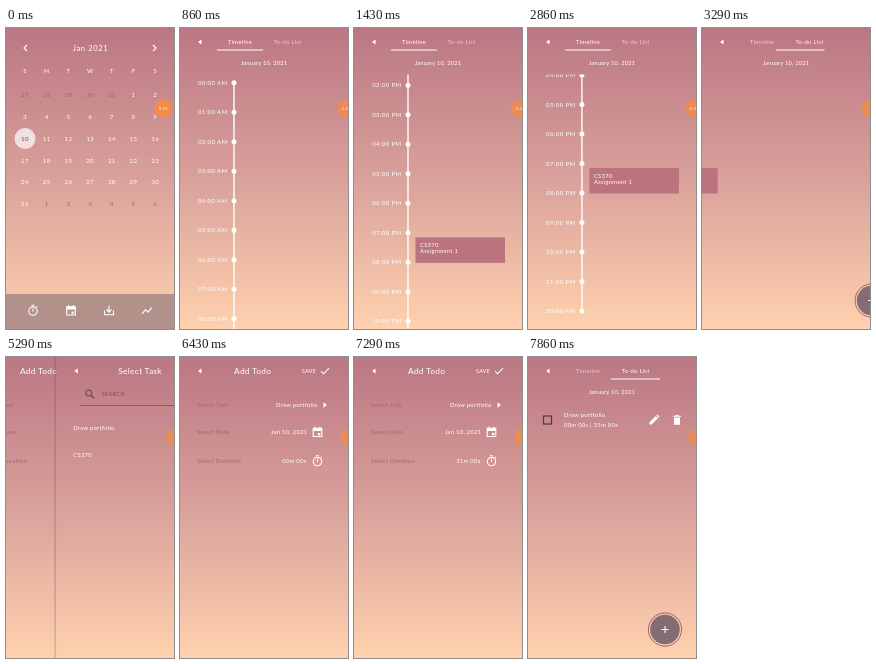
Animation, 168 px wide and 301 px high, one loop 8 s. Source, as an HTML page:

```html
<!DOCTYPE html>
<html lang="en">
<head>
<meta charset="utf-8">
<title>Planner</title>
<style>
html, body { margin: 0; width: 100%; height: 100%; overflow: hidden; background: #d8a09a; }
svg { display: block; width: 100vw; height: 100vh; }
text { font-family: Lato, "Open Sans", sans-serif; letter-spacing: .3px; fill: #fff; }
.dim { fill: #9c6672; }
.dark { fill: #75505b; }
.line { fill: none; stroke: #fff; stroke-width: 1.1; }
</style>
</head>
<body>
<svg id="stage" viewBox="0 0 168 301" preserveAspectRatio="none">
  <defs>
    <linearGradient id="sky" x2="0" y2="1">
      <stop stop-color="#bb7783"/>
      <stop offset=".5" stop-color="#d9a19b"/>
      <stop offset="1" stop-color="#ffd1ae"/>
    </linearGradient>
    <linearGradient id="edge">
      <stop stop-color="#5a3040" stop-opacity="0"/>
      <stop offset="1" stop-color="#5a3040" stop-opacity=".3"/>
    </linearGradient>
    <clipPath id="below"><rect y="46.5" width="168" height="255"/></clipPath>
  </defs>
  <g id="calendar"></g>
  <g id="day"></g>
  <g id="add"></g>
  <g id="select"></g>
  <g id="bubble"></g>
</svg>
<script>
const $ = id => document.getElementById(id);
const W = 168, FRAME = 1000 / 7, LOOP = 8000;

// ---- drawing helpers ----
const label = (x, y, s, size = 5.8, anchor = 'start', attrs = '') =>
  `<text x="${x}" y="${y + size * .35}" font-size="${size}" text-anchor="${anchor}" ${attrs}>${s}</text>`;
const path = (d, attrs = 'class="line"') => `<path d="${d}" ${attrs}/>`;
const at = (x, y, body) => `<g transform="translate(${x} ${y})">${body}</g>`;
const page = body =>
  `<rect x="-3" width="3" height="301" fill="url(#edge)"/><rect width="168" height="301" fill="url(#sky)"/>${body}`;
const back = path('M21.5 11.4v5.2l-3.4-2.6z', 'fill="#fff"');

const icons = {
  calendar: path('M-4.3-3.7h8.6v8.2h-8.6zM-2.4-5.4v2M2.4-5.4v2') + path('M-4.3-3.7h8.6v2.6h-8.6zM.5 1h2.3v2.2H.5z', 'fill="#fff"'),
  stopwatch: '<circle cy=".6" r="4.2" class="line"/>' + path('M-1.6-5.3h3.2M0-2v3M3.2-3.2l1-1'),
  download: path('M-4.5 0v4.3h9V0M0-5v6.4M-2.5-1L0 1.6 2.5-1'),
  trend: path('M-4.8 3l3.4-3.6L1 1.7 4.8-3'),
  pencil: path('M-4.6 4.6v-2.2L1.7-3.9 3.9-1.7-2.4 4.6zM2.4-4.5l1-.9 2.1 2.1-.9 1z', 'fill="#fff"'),
  trash: path('M-3-2.5h6v7.3h-6zM-4-4.3h2.2l.6-.7h2.4l.6.7H4v1.1h-8z', 'fill="#fff"'),
  search: '<circle cx="-1" cy="-1" r="2.9" stroke="#75505b" fill="none" stroke-width="1.2"/>' +
    path('M1.2 1.2L4.4 4.4', 'stroke="#75505b" stroke-width="1.5"')
};

// ---- screens ----
function buildCalendar() {
  const col = i => 19 + i * 21.7;
  let out = path('M21 17l-3 3 3 3M147 17l3 3-3 3') + label(84.5, 20, 'Jan 2021', 7.6, 'middle', 'style="letter-spacing:.6px"');
  [...'SMTWTFS'].forEach((d, i) => out += label(col(i), 43, d, 5.8, 'middle'));
  for (let i = 0; i < 42; i++) {
    const n = i - 4, inside = n > 0 && n < 32;
    const x = col(i % 7), y = 67 + Math.floor(i / 7) * 21.8;
    if (n === 10) out += `<circle cx="${x}" cy="${y}" r="10.5" fill="#f0e0e0"/>`;
    out += label(x, y, n < 1 ? n + 31 : n > 31 ? n - 31 : n, 6.2, 'middle',
      n === 10 ? 'style="fill:#5d4650"' : inside ? '' : 'class="dim"');
  }
  out += '<rect y="266" width="168" height="35" fill="#b2918a"/>';
  ['stopwatch', 'calendar', 'download', 'trend'].forEach((name, i) => out += at(27 + i * 38, 282.5, icons[name]));
  return page(out);
}

function buildDay() {
  const step = 29.5;
  let hours = path(`M54 55v${24 * step}`, 'stroke="#fff" stroke-width="1.4"');
  for (let h = 0; h <= 24; h++) {
    const y = 55 + h * step, h24 = h % 24;
    const shown = String(h24 > 12 ? h24 - 12 : h24).padStart(2, '0');
    hours += `<circle cx="54" cy="${y}" r="2.5" fill="#fff"/>` +
      label(47.5, y, `${shown}:00 ${h24 < 12 ? 'AM' : 'PM'}`, 6, 'end', 'style="letter-spacing:.4px"');
  }
  hours += '<rect x="61.5" y="620" width="89.5" height="25.5" fill="#bb737d"/>' +
    label(66, 627.5, 'CS370') + label(66, 634, 'Assignment 1');
  const todo = `<g id="item"><rect x="15.5" y="59" width="8" height="8" fill="none" stroke="#4f3a42" stroke-width="1.2"/>` +
    label(36, 57.5, 'Draw portfolio') + label(36, 68, '00m 00s | 31m 00s') +
    at(126, 63, icons.pencil) + at(149, 63, icons.trash) + '</g>' +
    '<circle cx="137" cy="272.5" r="16.6" fill="none" stroke="#966672" stroke-width="1"/>' +
    '<circle cx="137" cy="272.5" r="14.8" fill="#846c74"/>' + path('M133.5 272.5h7M137 269v7');
  return page(back +
    label(60, 14, 'Timeline', 5.8, 'middle', 'id="tabTime"') + label(107.5, 14, 'To-do List', 5.8, 'middle', 'id="tabTodo"') +
    '<rect id="underline" y="21.5" height="1" fill="#fff"/>' +
    label(84, 35, 'January 10, 2021', 5.7, 'middle', 'style="letter-spacing:.2px"') +
    `<g clip-path="url(#below)"><g id="hours">${hours}</g></g><g id="todo">${todo}</g>`);
}

const buildAdd = () => page(back + label(54, 14, 'Add Todo', 8.4) +
  label(122, 14, 'SAVE', 5.4) + path('M141 14.2l2.6 2.6 5.4-5.6') +
  label(17, 48, 'Select Task', 5.8, 'start', 'class="dim"') +
  label(17, 75, 'Select Date', 5.8, 'start', 'class="dim"') +
  label(17, 104, 'Select Duration', 5.8, 'start', 'class="dim"') +
  label(137.5, 48, 'Draw portfolio', 5.8, 'end', 'id="task"') + path('M143.5 45.2v5.6l3.4-2.8z', 'fill="#fff"') +
  label(127.5, 75, 'Jan 10, 2021', 5.8, 'end') + at(137.5, 75, icons.calendar) +
  label(126.5, 104, '00m 00s', 5.8, 'end', 'id="duration"') + at(137.5, 104, icons.stopwatch));

const buildSelect = () => page(back + label(62, 14, 'Select Task', 8.4) +
  at(33.5, 37, icons.search) + label(45.5, 37, 'SEARCH', 5.5, 'start', 'class="dark"') +
  path('M23 48.5h123', 'stroke="#75505b" stroke-width=".8"') +
  label(17, 71, 'Draw portfolio') + label(17, 97.5, 'CS370'));

$('calendar').innerHTML = buildCalendar();
$('day').innerHTML = buildDay();
$('add').innerHTML = buildAdd();
$('select').innerHTML = buildSelect();
$('bubble').innerHTML = '<circle r="9" fill="#f58c46"/>' + label(0, 0, '0:01', 4.2, 'middle');

// ---- motion ----
const ramp = (t, from, to) => Math.min(1, Math.max(0, (t - from) / (to - from)));
const ease = (t, from, to) => 1 - (1 - ramp(t, from, to)) ** 2.36;
const mix = (a, b, p) => a + (b - a) * p;
const move = (id, x, y = 0) => $(id).setAttribute('transform', `translate(${x} ${y})`);
const show = (id, on) => $(id).setAttribute('visibility', on ? 'inherit' : 'hidden');
const under = p => -.34 * W * p;

function render(time) {
  const t = Math.floor((time % LOOP + 4) / FRAME) * FRAME;
  const dayIn = ease(t, 430, 857);
  const addIn = ease(t, 4286, 5000) - ease(t, 7286, 7857);
  const selectIn = ease(t, 5000, 5714) - ease(t, 5857, 6428);
  const tab = ease(t, 2857, 3714);
  const scroll = 420 * ease(t, 857, 1571) + 60 * ease(t, 1857, 2142);

  move('calendar', under(dayIn));
  move('day', W * (1 - dayIn) + under(addIn));
  move('add', W * (1 - addIn) + under(selectIn));
  move('select', W * (1 - selectIn));
  show('day', dayIn > 0);
  show('add', addIn > 0);
  show('select', selectIn > 0);

  move('hours', -W * tab, -scroll);
  move('todo', W * (1 - tab));
  show('todo', tab > 0);
  $('underline').setAttribute('x', mix(37, 83, tab));
  $('underline').setAttribute('width', mix(46, 49, tab));
  $('tabTime').setAttribute('opacity', mix(1, .6, tab));
  $('tabTodo').setAttribute('opacity', mix(.6, 1, tab));

  show('task', t > 5850);
  show('item', t > 6800);
  const minutes = Math.round(31 * ramp(t, 6714, 7286));
  $('duration').textContent = String(minutes).padStart(2, '0') + 'm 00s';

  // the bubble docks at the edge, then tucks a little further in
  move('bubble', mix(157.5, 166.5, dayIn) + 3 * tab, 80.5);
  $('bubble').setAttribute('opacity', mix(1, .8, dayIn));
  $('bubble').lastChild.setAttribute('opacity', 1 - tab);
}

const start = performance.now();
function tick() {
  render(performance.now() - start);
  requestAnimationFrame(tick);
}
tick();
</script>
</body>
</html>
```
